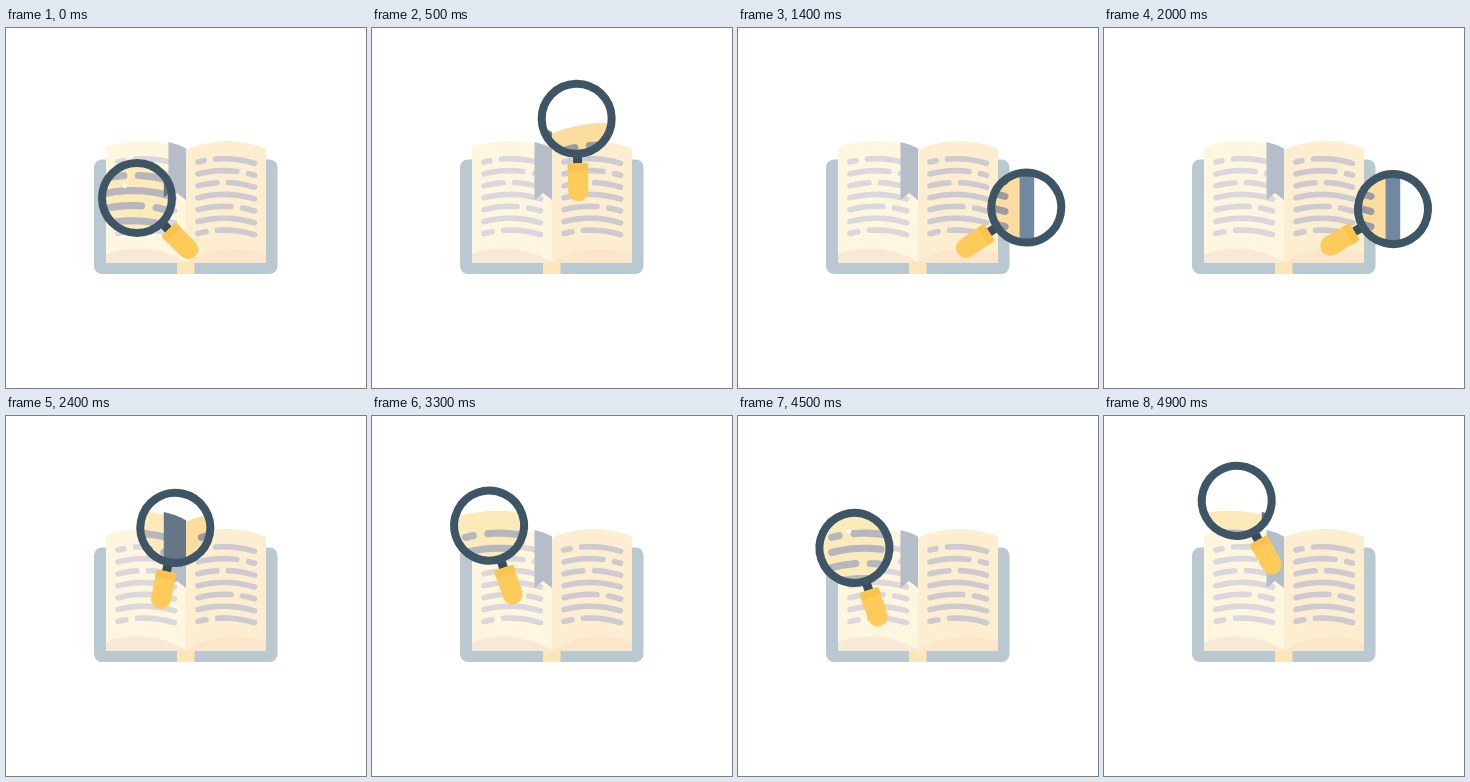
An HTML page with a canvas for the animation above (5 s loop, 360 by 360 pixels).

```html
<!DOCTYPE html>
<html lang="en">
<head>
<meta charset="utf-8">
<title>Searching a book</title>
<style>
html, body { margin: 0; width: 100%; height: 100%; overflow: hidden; background: #fff; }
canvas { display: block; width: 360px; height: 360px; }
</style>
</head>
<body>
<canvas id="stage"></canvas>
<script>
const canvas = document.getElementById('stage');
const ctx = canvas.getContext('2d');
const dpr = window.devicePixelRatio || 1;
canvas.width = canvas.height = 360 * dpr;

const LOOP = 5000;
const ZOOM = 1.27;

const pale = {
  cover: '#bac8d1', spine: '#fce6b8', mark: '#b4bdc8',
  page: ['#fef6df', '#feeed1'], fold: ['#f8e9d6', '#fbe6cb'], line: ['#dad8dc', '#cdcad0']
};
const vivid = {
  cover: '#7089a0', spine: '#fbc85c', mark: '#657786',
  page: ['#fdeaba', '#fcdd9f'], fold: ['#eecb9c', '#f0c489'], line: ['#b6b6be', '#9c9ba3']
};

// Lens poses are [x, y, handle angle]; "via" bends the path between two poses.
const rest = [131, 170, 45];
const moves = [
  { from: 0, to: 674, via: [150, 100, 68], pose: [213, 89, 92] },
  { from: 674, to: 1674, pose: [295, 187.5, 151] },
  { from: 1775, to: 2825, via: [220, 105, 135], pose: [117, 107, 71] },
  { from: 3080, to: 3890, pose: [118, 139.5, 72] },
  { from: 4300, to: 5000, via: [108, 98, 68], pose: [133.3, 84.5, 61] }
];

const mix = (a, b, t) => a.map((p, i) => p + (b[i] - p) * t);
const ease = t => t < 0.5 ? 4 * t ** 3 : 1 - 4 * (1 - t) ** 3;

function poseAt(time) {
  let pose = rest;
  for (const move of moves) {
    if (time < move.from) break;
    const u = ease(Math.min(1, (time - move.from) / (move.to - move.from)));
    const via = move.via || mix(pose, move.pose, 0.5);
    pose = mix(mix(pose, via, u), mix(via, move.pose, u), u);
  }
  return pose;
}

function fillPath(d, color) {
  ctx.fillStyle = color;
  ctx.fill(new Path2D(d));
}

function roundBox(x, y, w, h, r, color) {
  ctx.fillStyle = color;
  ctx.beginPath();
  ctx.roundRect(x, y, w, h, r);
  ctx.fill();
}

function drawStroke(left, top, from, to) {
  ctx.beginPath();
  for (let k = 0; k <= 8; k++) {
    const x = from + (to - from) * k / 8;
    ctx.lineTo(left + x, top + 4.5 * ((x - 38) / 30) ** 2);
  }
  ctx.stroke();
}

// Each text row runs across the page, broken by one gap or none (0).
function drawText(left, color) {
  ctx.strokeStyle = color;
  ctx.lineWidth = 5.6;
  ctx.lineCap = 'round';
  [18, 51, 31, 0, 45, 0, 20].forEach((gap, n) => {
    const top = 130.7 + n * 11.9;
    if (gap) drawStroke(left, top, 12, gap);
    drawStroke(left, top, gap ? gap + 11.5 : 12, 68.5);
  });
}

function drawBook(c) {
  roundBox(88, 131.5, 183.5, 114.5, 8, c.cover);
  ctx.fillStyle = c.spine;
  ctx.fillRect(171, 234, 17.5, 12);
  fillPath('M100 119Q140 106 180 121.5V235H100Z', c.page[0]);
  fillPath('M180 121.5Q220 105 260 120.5V235H180Z', c.page[1]);
  fillPath('M100 226Q143 212 180 234V235H100Z', c.fold[0]);
  fillPath('M180 234Q217 212 260 226V235H180Z', c.fold[1]);
  drawText(100, c.line[0]);
  drawText(180, c.line[1]);
  fillPath('M162.5 114Q172 116 180 120.5V172L171 165L162.5 172Z', c.mark);
}

// A larger copy of the book stays still; the lens only reveals it.
function drawView(x, y) {
  ctx.save();
  ctx.beginPath();
  ctx.arc(x, y, 33, 0, Math.PI * 2);
  ctx.clip();
  ctx.fillStyle = '#fff';
  ctx.fillRect(0, 0, 360, 360);
  ctx.translate(180, 181);
  ctx.scale(ZOOM, ZOOM);
  ctx.translate(-180, -181);
  drawBook(vivid);
  ctx.restore();
}

function drawGlass(x, y, angle) {
  ctx.save();
  ctx.translate(x, y);
  ctx.rotate(angle * Math.PI / 180);
  roundBox(-20, -2.5, 5, 5, 2.5, 'rgba(255,255,255,.8)');
  ctx.fillStyle = '#3a4b59';
  ctx.fillRect(37, -4.5, 10, 9);
  roundBox(44.5, -10, 38, 20, [2, 10, 10, 2], '#fdcb5a');
  roundBox(44.5, -10, 8, 20, [2, 0, 0, 2], '#fac350');
  ctx.strokeStyle = '#3e5566';
  ctx.lineWidth = 8;
  ctx.beginPath();
  ctx.arc(0, 0, 35, 0, Math.PI * 2);
  ctx.stroke();
  ctx.restore();
}

function draw(time) {
  const [x, y, angle] = poseAt(time);
  ctx.setTransform(dpr, 0, 0, dpr, 0, 0);
  ctx.fillStyle = '#fff';
  ctx.fillRect(0, 0, 360, 360);
  drawBook(pale);
  drawView(x, y);
  drawGlass(x, y, angle);
}

const begin = performance.now();
function tick() {
  draw((performance.now() - begin) % LOOP);
  requestAnimationFrame(tick);
}
tick();
</script>
</body>
</html>
```
